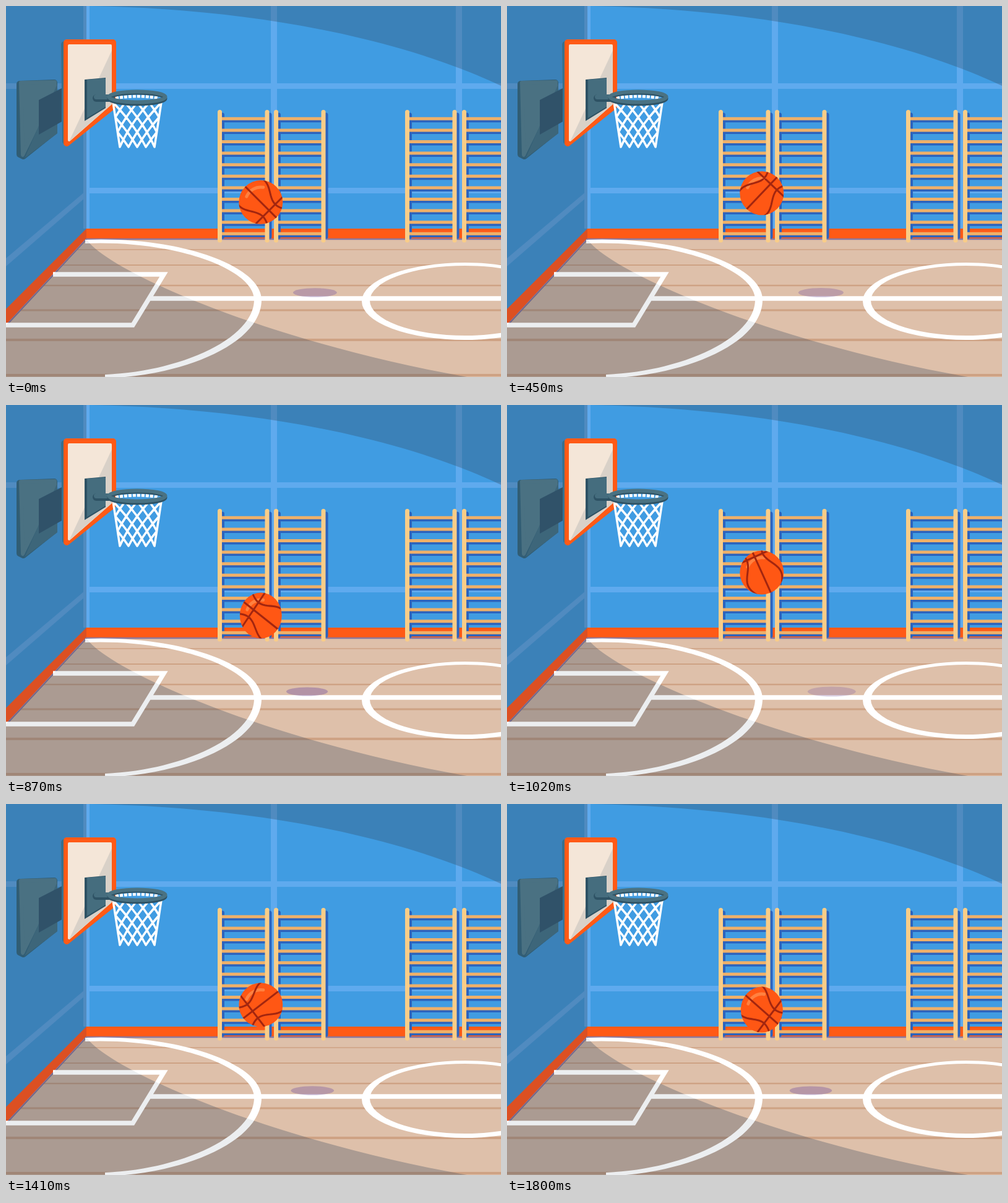
An HTML page for the animation above (1.83 s loop, 800 by 600 pixels).

```html
<!DOCTYPE html>
<html lang="en">
<head>
<meta charset="utf-8">
<title>Bouncing basketball</title>
<style>
  html, body { margin: 0; width: 100%; height: 100%; overflow: hidden; background: #409ce2; }
  svg { display: block; width: 100vw; height: 100vh; }
</style>
</head>
<body>
<svg viewBox="0 0 800 600" fill="none">
  <defs>
    <clipPath id="ballClip"><circle r="35.5"/></clipPath>
    <path id="floorShade" d="M130 377C160 425 410 540 745 600H0V516Z"/>
  </defs>

  <!-- walls -->
  <path fill="#409ce2" d="M0 0H800V376H0Z"/>
  <g fill="#5faaee">
    <path d="M0 125H800V134H0ZM130 294H800V303H130ZM428 0H438V360H428ZM727 0H737V360H727ZM125 0H135V360H125Z"/>
    <path d="M0 408L128 300V310L0 421Z"/>
  </g>
  <g fill="#2f4256" fill-opacity=".3">
    <path d="M140 0C380 5 620 45 800 129V0Z"/>
    <path d="M0 0H130V376L0 516Z"/>
  </g>

  <!-- floor -->
  <path fill="#dec0aa" d="M130 376H800V600H0V516Z"/>
  <path id="planks" fill="#cea284"/>
  <path fill="#ff5a16" d="M130 360H800V376H130Z"/>
  <path fill="#dc5022" d="M130 360V376L0 516V490Z"/>
  <path stroke="#8b779c" stroke-width="2.5" d="M0 517L130 377H800"/>
  <use href="#floorShade" fill="#2f4256" fill-opacity=".22"/>
  <g fill="#fff" fill-rule="evenodd">
    <path d="M128 378C280 372 413 420 413 475C413 545 290 598 160 602V596C290 590 401 535 401 475C401 425 270 378 128 384Z"/>
    <path d="M575 477.500a167 62.500 0 1 0 334 0a167 62.500 0 1 0-334 0ZM588 476.500a154 56.500 0 1 0 308 0a154 56.500 0 1 0-308 0Z"/>
  </g>
  <path stroke="#fff" stroke-width="7.500" d="M76 434H255L205 516H0M232 473H401M412 473H580"/>
  <path stroke="#fff" stroke-width="7.500" d="M580 473H800"/>
  <use href="#floorShade" fill="#2f4256" fill-opacity=".09"/>

  <g id="ladders" stroke-linecap="round"></g>

  <!-- backboard and its wall shadow -->
  <g stroke-linejoin="round" stroke-width="10">
    <path fill="#315d74" stroke="#315d74" d="M22 126L78 124V203L28 243L22 240Z"/>
    <path fill="#4a7182" stroke="#4a7182" stroke-width="6" d="M24 124L79 123V135L27 241Z"/>
    <path fill="#3d667a" d="M83 126V206L30 246Z"/>
    <path fill="#305269" d="M53 152L90 133V187L53 208Z"/>
    <path fill="#39708c" stroke="#39708c" d="M94 62H171V162L96 219Z"/>
    <path fill="#ff5a16" stroke="#ff5a16" d="M98 59H173V162L98 222Z"/>
  </g>
  <path fill="#f4e6d8" stroke="#f4e6d8" stroke-width="4" stroke-linejoin="round" d="M102 64H169V158L102 217Z"/>
  <path fill="#d9d1c8" d="M171 72V159L102 219Z"/>
  <path fill="#2e5264" d="M127 119L161 116V165L127 186Z"/>
  <path fill="#456d7e" d="M131 119L161 117V163L131 181Z"/>

  <path id="net" stroke="#fff" stroke-width="3.500" stroke-linecap="round" stroke-linejoin="round"/>
  <path stroke="#2e5264" stroke-width="12" stroke-linecap="round" d="M146 149H170"/>
  <path stroke="#456d7e" stroke-width="8" stroke-linecap="round" d="M146 147H170"/>
  <path stroke="#fff" stroke-width="5" stroke-dasharray="5 2" d="M177 149Q212 143 247 149"/>
  <ellipse cx="212" cy="149.500" rx="45.500" ry="9" stroke="#2e5264" stroke-width="6"/>
  <ellipse cx="212" cy="147" rx="45.500" ry="8.500" stroke="#4a7282" stroke-width="6"/>

  <ellipse id="shadow" cy="463.500" fill="#7a58a0"/>
  <g id="ball">
    <circle r="35.500" fill="#ff5714"/>
    <g clip-path="url(#ballClip)">
      <path stroke="#ff8140" stroke-width="5" stroke-linecap="round" d="M-23-9A25 25 0 0 1 4-24"/>
      <path id="seams" stroke="#a3260f" stroke-width="3"/>
    </g>
  </g>
</svg>
<script>
const $ = id => document.getElementById(id);
const mod = (a, n) => ((a % n) + n) % n;

const LOOP = 1830, STEP = 30, BOUNCE = LOOP / 2, PEAK = 240;
const TOP = 242, DROP = 192, SEAM_PERIOD = 78;

function drawPlanks() {
  const planks = [[394, 1.5], [419, 2], [452, 2.5], [492, 3], [540, 4], [597, 4]];
  $('planks').setAttribute('d', planks.map(([y, h]) => {
    const x = Math.max(0, 130 - (y - 376) * 130 / 140);
    return `M${x} ${y - h / 2}H800v${h}H${x}Z`;
  }).join(''));
}

function drawLadders() {
  const line = (d, color, width) =>
    `<path d="${d}" stroke="${color}" stroke-width="${width}"/>`;
  const rungs = (x, dy) => Array.from({ length: 11 }, (_, i) =>
    `M${x} ${182.3 + i * 18.6 + dy}h76`).join('');
  const posts = (x, top, bottom) => `M${x} ${top}V${bottom}m76.500 0V${top}`;
  const pairs = [345.5, 436.5, 648.5, 740.5];
  const shade = pairs.map(x =>
    line(rungs(x + 5, 4), '#2c63bd', 4) + line(posts(x + 4, 176, 373), '#2c63bd', 7)).join('');
  const wood = pairs.map(x =>
    line(rungs(x, 0), '#efb069', 5) + line(posts(x, 171.5, 379), '#f9cd88', 7)).join('');
  $('ladders').innerHTML = shade + wood;
}

function drawNet() {
  const rows = 6, cols = 4;
  const node = (r, c) => {
    const half = 39 - 11 * r / rows;
    return `${212 - half + 2 * half * c / cols} ${156 + r * 12}`;
  };
  let d = `M${node(0, 0)}L${node(rows, 0)}M${node(0, cols)}L${node(rows, cols)}`;
  for (let r = 0; r < rows; r++)
    for (let c = 0; c < cols; c++) {
      const a = r % 2, mid = c + 0.5;
      for (const end of [c, c + 1])
        d += a ? `M${node(r, mid)}L${node(r + 1, end)}` : `M${node(r, end)}L${node(r + 1, mid)}`;
    }
  $('net').setAttribute('d', d);
}

// Endless seam pattern: one spine, cross seams and two waving sides.
function drawSeams() {
  let d = 'M-120 0H120';
  for (const u of [-1, 0, 1]) d += `M${u * SEAM_PERIOD}-40v80`;
  for (const side of [-1, 1])
    for (let u = -120; u <= 120; u += 3) {
      const v = 14 + 7.5 * (1 - Math.cos(2 * Math.PI * u / SEAM_PERIOD));
      d += `${u === -120 ? 'M' : 'L'}${u} ${(side * v).toFixed(2)}`;
    }
  $('seams').setAttribute('d', d);
}

// Eases softly away from the peak, then falls almost evenly.
function fall(q) {
  let lo = 0, hi = 1;
  for (let i = 0; i < 24; i++) {
    const v = (lo + hi) / 2;
    if (v + 0.5 * v * v - 0.5 * v ** 3 < q) lo = v; else hi = v;
  }
  return 2.5 * lo * lo - 1.5 * lo ** 3;
}

// Time since contact, horizontal radius, vertical radius.
const SQUASH = [
  [0, 40, 32], [25, 37, 34.5], [90, 33.7, 37.5], [187, 34, 37],
  [217, 35.5, 35.5], [885, 35.5, 35.5], [915, 40, 32]
];
function radii(b) {
  const i = Math.max(1, SQUASH.findIndex(k => k[0] >= b));
  const [from, to] = [SQUASH[i - 1], SQUASH[i]];
  const f = (b - from[0]) / (to[0] - from[0]);
  return [1, 2].map(n => from[n] + (to[n] - from[n]) * f);
}

function render(t) {
  const sinceContact = mod(t - PEAK + BOUNCE / 2, BOUNCE);
  const y = TOP + DROP * fall(Math.abs(sinceContact / BOUNCE * 2 - 1));
  const [rx, ry] = radii(sinceContact);
  $('ball').setAttribute('transform',
    `translate(411.8 ${y}) scale(${rx / 35.5} ${ry / 35.5})`);

  const turn = 45 + 360 * t / LOOP;
  const slide = mod(19 + 2 * SEAM_PERIOD * t / LOOP + SEAM_PERIOD / 2, SEAM_PERIOD) - SEAM_PERIOD / 2;
  $('seams').setAttribute('transform', `rotate(${turn}) translate(${slide} 0)`);

  const height = 425 - y;
  const shadow = { cx: 440 + height * 0.551, rx: 27 + height * 0.078,
    ry: 5.7 + height * 0.015, opacity: 0.62 - height * 0.0023 };
  for (const key in shadow) $('shadow').setAttribute(key, shadow[key]);
}

drawPlanks();
drawLadders();
drawNet();
drawSeams();

const start = performance.now();
function tick() {
  let step = Math.floor(mod(performance.now() - start, LOOP) / STEP);
  if (step === 25) step = 24; // one pose is held for two steps
  render(step * STEP);
  requestAnimationFrame(tick);
}
tick();
</script>
</body>
</html>
```
